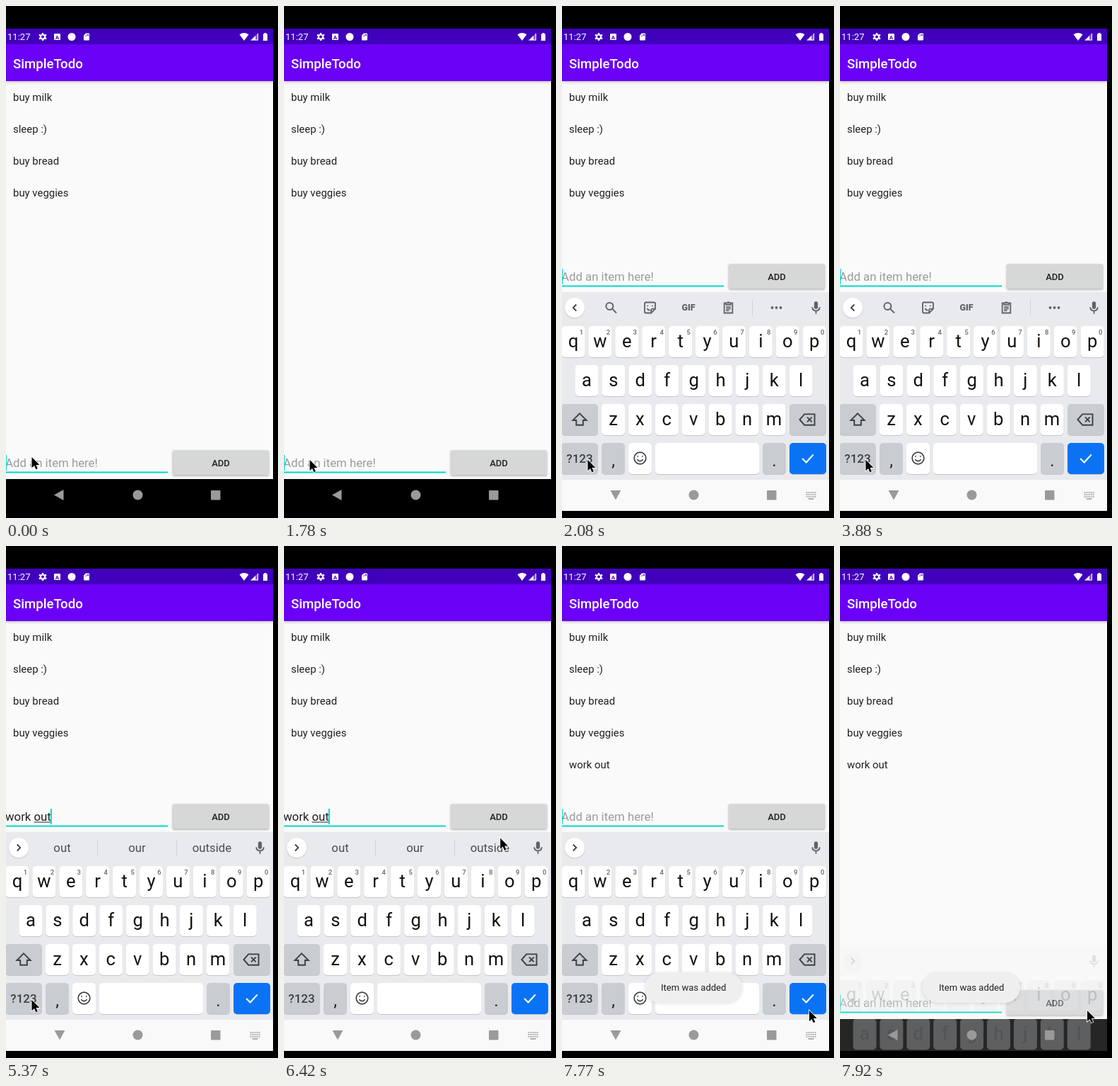
Animation of 385 by 723 pixels, one loop 8 s. Source, as an HTML page with a canvas:

```html
<!DOCTYPE html>
<html lang="en">
<head>
<meta charset="utf-8">
<title>SimpleTodo</title>
<style>
  html, body { margin: 0; width: 100%; height: 100%; overflow: hidden; background: #000; }
  canvas { display: block; }
</style>
</head>
<body>
<canvas width="385" height="723"></canvas>
<script>
const ctx = document.querySelector('canvas').getContext('2d');
const LOOP = 8000, STEP = 149.4;
const TEAL = '#03dac5', INK = '#212121', KEY_INK = '#3c4043';
const SCREEN_W = 378, KEYBOARD_SHIFT = 263;

const ITEMS = ['buy milk', 'sleep :)', 'buy bread', 'buy veggies'];
const CARET_TOGGLES = [3, 6, 9, 11, 16, 19, 23, 26, 29, 30];
const TYPING_START = 30, ADDED = 45;
const TYPED = ['w', 'wo', 'wor', 'work', 'work ', 'work o', 'work out'];
const SUGGESTIONS = [
  ['w', 'with', 'we'], ['wo', 'would', 'work'], ['wor', 'work', 'working'],
  ['work', 'working', 'works'], ['out', 'on', 'with'], ['o', 'on', 'out'],
  ['out', 'our', 'outside']
];

const ICONS = {
  gear: 'M12 1L14 1L15 5L18 6L21 4L23 8L20 11V13L23 16L21 20L18 18L15 20L14 23H10L9 20L6 18L3 20L1 16L4 13V11L1 8L3 4L6 6L9 5L10 1ZM12 8A4 4 0 1 0 12 16A4 4 0 1 0 12 8Z',
  card: 'M10 2H18Q20 2 20 4V20Q20 22 18 22H6Q4 22 4 20V8ZM9 8V11H11V8ZM13 5V9H15V5ZM16 5V9H18V5Z',
  wifi: 'M12 22L0 6Q12 -2 24 6Z',
  battery: 'M9 1H15V4H18V23H6V4H9Z',
  search: 'M15.5 9.5A6 6 0 1 1 3.5 9.5A6 6 0 1 1 15.5 9.5M14 14L21 21',
  sticker: 'M5 3H19Q21 3 21 5V14L14 21H5Q3 21 3 19V5Q3 3 5 3ZM14 21V16Q14 14 16 14H21M8 8V10M16 8V10M7 13Q9 17 12 16',
  clipboard: 'M5 4H19V21H5ZM8 4V7H16V4M10 3H14M8 11H16M8 14H16M8 17H13',
  mic: 'M12 2A3 3 0 0 1 15 5V11A3 3 0 0 1 9 11V5A3 3 0 0 1 12 2ZM5 11H7A5 5 0 0 0 17 11H19A7 7 0 0 1 13 18V22H11V18A7 7 0 0 1 5 11Z',
  shift: 'M12 3L22 13H17V20H7V13H2Z',
  backspace: 'M8 4H23V20H8L1 12ZM12 8.5L19 15.5M19 8.5L12 15.5',
  smile: 'M22 12A10 10 0 1 1 2 12A10 10 0 1 1 22 12M7 14Q12 20 17 14M8 8V10M16 8V10',
  check: 'M4 12L10 18L21 6',
  left: 'M15 6L9 12L15 18',
  right: 'M9 6L15 12L9 18'
};

function rect(x, y, w, h, color, radius = 0) {
  ctx.fillStyle = color;
  ctx.beginPath();
  ctx.roundRect(x, y, w, h, radius);
  ctx.fill();
}

function circle(x, y, r, color) {
  ctx.fillStyle = color;
  ctx.beginPath();
  ctx.arc(x, y, r, 0, 7);
  ctx.fill();
}

function text(str, x, y, size, color, align = 'left', weight = 400) {
  ctx.font = `${weight} ${size}px Roboto, sans-serif`;
  ctx.textAlign = align;
  ctx.fillStyle = color;
  ctx.fillText(str, x, y);
}

function shape(path, color) {
  ctx.fillStyle = color;
  ctx.fill(new Path2D(path));
}

// Icons use a 24-unit box centred on x, y; a line width makes them outlined.
function icon(name, x, y, size, color, line) {
  const path = new Path2D(ICONS[name]);
  ctx.save();
  ctx.translate(x - size / 2, y - size / 2);
  ctx.scale(size / 24, size / 24);
  ctx.fillStyle = ctx.strokeStyle = color;
  ctx.lineWidth = line;
  if (line) ctx.stroke(path);
  else ctx.fill(path, 'evenodd');
  ctx.restore();
}

function withShadow(blur, offset, alpha, draw) {
  ctx.save();
  ctx.shadowColor = `rgba(0,0,0,${alpha})`;
  ctx.shadowBlur = blur;
  ctx.shadowOffsetY = offset;
  draw();
  ctx.restore();
}

function drawHeader() {
  withShadow(4, 1, 0.3, () => rect(0, 54, SCREEN_W, 52, '#6a00f5'));
  rect(0, 32, SCREEN_W, 22, '#4100bc');
  text('11:27', 2, 48, 13.05, '#fff');
  icon('gear', 52, 43.5, 12, '#fff');
  rect(68, 39, 9, 9, '#fff', 1);
  text('A', 72.5, 46.5, 8, '#4100bc', 'center', 700);
  circle(93, 43.5, 5.5, '#fff');
  icon('card', 114, 43.5, 12, '#fff');
  icon('wifi', 337, 43.5, 13, '#fff');
  shape('M357 38V48.500H346.500Z', 'rgba(255,255,255,.4)');
  shape('M353 42V48.500H346.500ZM356 39H357V48.500H346.500V47.500H356Z', '#fff');
  icon('battery', 367, 43.5, 12, '#fff');
  text('SimpleTodo', 10, 87.5, 18.66, '#fff', 'left', 500);
}

function drawInput(y, typed, caretOn, pressed) {
  if (typed) {
    text(typed, -1, y + 6, 16.8, INK);
    const end = ctx.measureText(typed).width - 1;
    const start = ctx.measureText(typed.slice(0, typed.lastIndexOf(' ') + 1)).width - 1;
    if (start < end) rect(start, y + 7.5, end - start, 1, INK);
    if (caretOn) rect(end - 1, y - 11, 2, 22, TEAL);
  } else {
    text('Add an item here!', -1, y + 6, 16.8, '#9b9b9b');
    if (caretOn) rect(0, y - 11, 1, 22, TEAL);
  }
  rect(0, y + 12.5, 229, 2, TEAL);
  withShadow(3, 1, 0.35, () => rect(236, y - 17.5, 136, 35, pressed ? '#c2c3c3' : '#d6d7d7', 2));
  text('ADD', 304, y + 4.5, 13.05, INK, 'center', 500);
}

function drawKey(x, y, w, color) {
  rect(x, y + 1, w, 44, '#c3c6ca', 5);
  rect(x, y, w, 44, color, 5);
}

function drawLetters(letters, firstX, y, numbered) {
  [...letters].forEach((letter, i) => {
    const x = firstX + 37.9 * i;
    drawKey(x - 16.5, y, 33, '#fff');
    text(letter, x, y + 30, 25.6, '#111', 'center');
    if (numbered) text((i + 1) % 10, x + 11.5, y + 11.5, 9.5, '#666', 'center', 500);
  });
}

function drawSuggestionBar(suggestions) {
  withShadow(2, 1, 0.15, () => circle(18, 426, 14, '#fff'));
  icon(suggestions ? 'right' : 'left', 18, 426, 18, KEY_INK, 2.4);
  icon('mic', 359.5, 426, 21, '#5f6368');
  if (!suggestions) {
    icon('search', 69.5, 426, 20, '#5f6368', 2.4);
    icon('sticker', 124.5, 426, 20, '#5f6368', 2.2);
    text('GIF', 179, 430, 12.5, '#5f6368', 'center', 900);
    icon('clipboard', 235.5, 426, 20, '#5f6368', 2.2);
    rect(269, 415, 1, 22, '#cfd2d6');
    for (const x of [297.5, 303.5, 309.5]) circle(x, 426, 1.9, '#5f6368');
  } else if (suggestions.length) {
    suggestions.forEach((word, i) => text(word, 79.5 + 106 * i, 432, 16.8, '#4a4d51', 'center'));
    rect(129, 415, 1, 22, '#cfd2d6');
    rect(241, 415, 1, 22, '#cfd2d6');
  }
}

function drawKeyboard(offset, alpha, suggestions) {
  const dark = '#c9cdd2';
  ctx.save();
  ctx.beginPath();
  ctx.rect(0, 404, SCREEN_W, 309);
  ctx.clip();
  ctx.globalAlpha = alpha;
  ctx.translate(0, offset);
  rect(0, 404, SCREEN_W, 309, '#e8eaed');
  drawSuggestionBar(suggestions);
  drawLetters('qwertyuiop', 16, 452, true);
  drawLetters('asdfghjkl', 35, 507);
  drawLetters('zxcvbnm', 72.5, 562);
  drawKey(-1, 562, 52, dark);
  icon('shift', 25, 584, 23, KEY_INK, 2);
  drawKey(322, 562, 52, dark);
  icon('backspace', 347, 584, 23, KEY_INK, 2);
  drawKey(-1, 617, 52, dark);
  text('?123', 25, 645, 17, KEY_INK, 'center', 500);
  drawKey(56, 617, 33, dark);
  text(',', 72.5, 650, 24, INK, 'center');
  drawKey(94, 617, 33, '#fff');
  icon('smile', 110.5, 638.5, 20, KEY_INK, 2);
  drawKey(132, 617, 147, '#fff');
  drawKey(284, 617, 33, dark);
  text('.', 300.5, 650, 24, INK, 'center');
  drawKey(322, 617, 52, '#0a73f5');
  icon('check', 347.5, 639, 22, '#fff', 2.2);
  ctx.restore();
}

function drawNavigation(light) {
  const color = '#9a9a9a';
  if (light) {
    rect(0, 669, SCREEN_W, 44, '#f9f9f9');
    shape('M68.500 684H83.500L76 697.500Z', color);
    for (let i = 0; i < 15; i++) rect(345.5 + (i % 5) * 3, 686 + Math.floor(i / 5) * 3, 2, 2, '#b0b0b0');
    rect(348.5, 695, 8, 2, '#b0b0b0');
  } else {
    shape('M68 690.500L81.500 683V698Z', color);
  }
  circle(186.5, 690.5, 7, color);
  rect(290, 684, 13.5, 13.5, color, 1);
}

function drawToast(alpha) {
  ctx.save();
  ctx.globalAlpha = alpha;
  withShadow(5, 1, 0.12, () => rect(117, 602, 138, 43, '#efefef', 21.5));
  text('Item was added', 140, 628, 13.05, INK);
  ctx.restore();
}

function pointerAt(step) {
  const ease = (from, steps) => {
    const p = Math.min(1, Math.max(0, (step - from) / steps));
    return p * p * (3 - 2 * p);
  };
  const toAdd = ease(39, 5), toCheck = ease(46, 5);
  return [
    36.5 + 301 * toAdd + 12.5 * toCheck + 30 * Math.sin(Math.PI * toCheck),
    (step < 5 ? 637 : 641) - 255 * toAdd + 270 * toCheck
  ];
}

function drawPointer(x, y) {
  const arrow = new Path2D('M0 0V15.300L3.500 12L5.800 17.300L8.300 16.200L6 11.100H10.900Z');
  ctx.save();
  ctx.translate(x, y);
  ctx.lineWidth = 1.6;
  ctx.strokeStyle = '#fff';
  ctx.stroke(arrow);
  ctx.fillStyle = '#000';
  ctx.fill(arrow);
  ctx.restore();
}

function draw(time) {
  const step = Math.floor((time % LOOP + 14) / STEP);
  const open = step >= 14 && step < 53;
  const caretOn = CARET_TOGGLES.filter(s => s <= step).length % 2 === 0;
  const typing = step >= TYPING_START && step < ADDED;
  const typedIndex = Math.min(step - TYPING_START, TYPED.length - 1);

  rect(0, 0, 385, 723, '#000');
  rect(0, 106, SCREEN_W, 562, '#fafafa');
  drawHeader();
  const items = step >= ADDED ? [...ITEMS, 'work out'] : ITEMS;
  items.forEach((item, i) => text(item, 10, Math.round(134.3 + 44.8 * i), 14.93, INK));
  drawInput(open ? 645 - KEYBOARD_SHIFT : 645, typing ? TYPED[typedIndex] : '', caretOn, step === 44);

  if (step === 13) drawKeyboard(80, 0.5, null);
  else if (step === 53) drawKeyboard(160, 0.16, []);
  else if (open) drawKeyboard(0, 1, typing ? SUGGESTIONS[typedIndex] : step === 52 ? [] : null);

  drawNavigation(open);
  if (step >= 46) drawToast(step === 46 ? 0.65 : 1);
  drawPointer(...pointerAt(step));
}

function frame() {
  draw(performance.now());
  requestAnimationFrame(frame);
}
frame();
</script>
</body>
</html>
```
